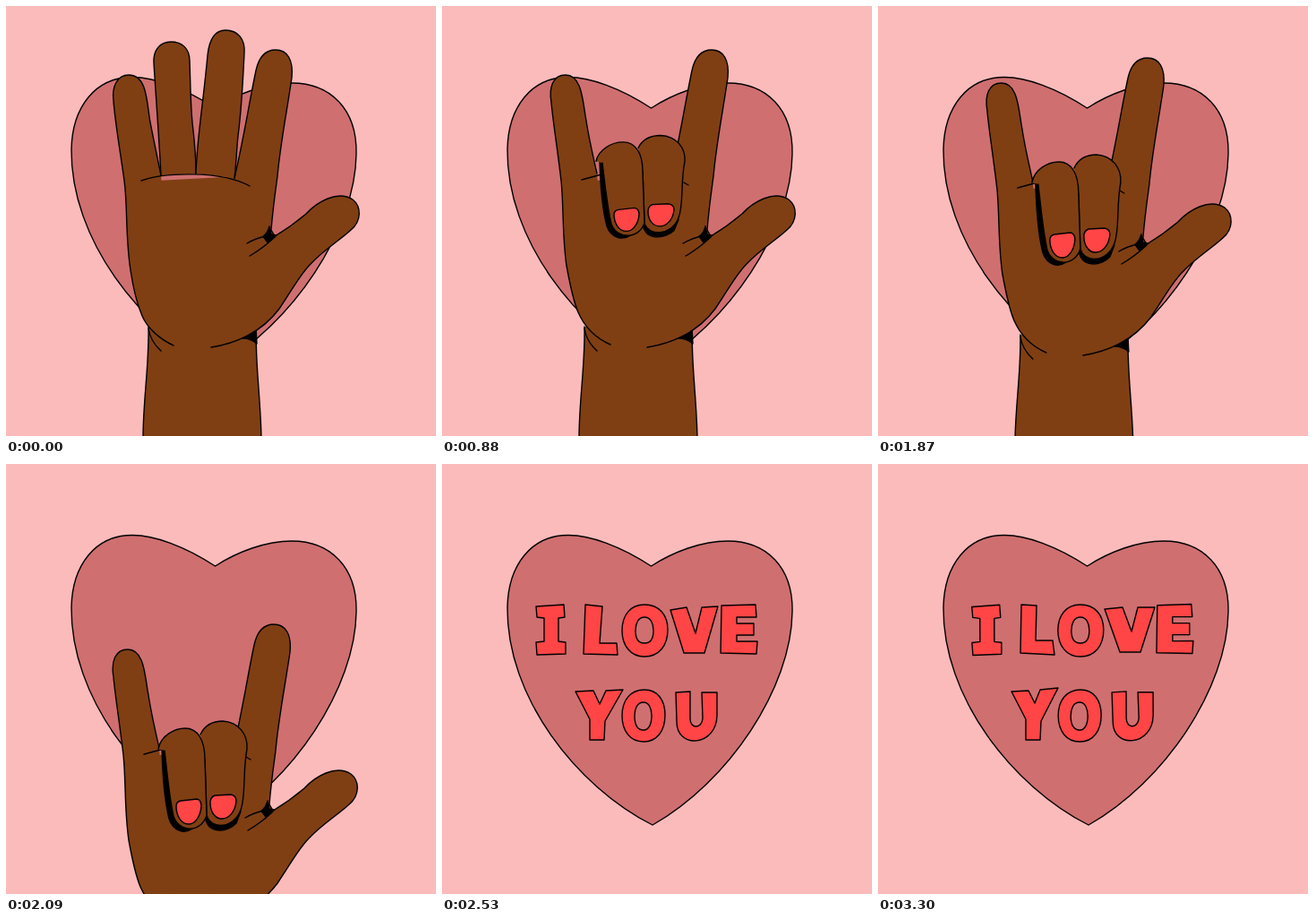
An HTML page that plays this animation: 480 px wide and 480 px high, repeating every 3.41 s.

```html
<!DOCTYPE html>
<html lang="en">
<head>
<meta charset="utf-8">
<title>I love you</title>
<style>
html, body { margin: 0; width: 100%; height: 100%; overflow: hidden; background: #fcbbbb; }
svg { display: block; width: 100%; height: 100%; }
path { stroke: #000; stroke-width: 1.4; stroke-linecap: round; stroke-linejoin: round; }
.heart { fill: #cf6f70; }
.skin { fill: #7f3f13; }
.red { fill: #ff4545; fill-rule: evenodd; }
.line { fill: none; }
.plain { stroke: none; }
</style>
</head>
<body>
<svg viewBox="0 0 480 480">
  <path class="heart" d="M233.5 114C200 92 165 79 140 79.5C100 80 74 112 73 160C72 260 150 360 235 403C320 355 390 250 391 165C392 115 362 86 319 86C290 86 258 98 233.5 114Z"/>

  <g id="words" role="img" aria-label="I love you">
    <g id="steady">
      <path class="red" d="M105 159Q120 158 136 157L137 171 130 172 130 198 138 199 138 212 106 213 105 199 114 198 114 172 106 171Z"/>
      <path class="red" d="M226 157C243 157 252 169 252 185C252 203 242 215 226 215C210 215 201 202 201 186C201 169 210 157 226 157ZM226 171C219 171 216 178 216 186C216 194 219 200 226 200C233 200 236 194 236 186C236 178 233 171 226 171Z"/>
      <path class="red" d="M312 158L350 157 351 171 329 171 329 178 348 178 348 191 329 191 329 198 352 198 351 212 311 211Z"/>
      <path class="red" d="M226 252C241 252 249 264 249 280C249 298 240 310 225 310C210 310 201 298 201 281C201 264 210 252 226 252ZM225 266C218 266 215 273 215 281C215 290 218 297 225 297C231 297 234 290 234 281C234 273 231 266 225 266Z"/>
      <path class="red" d="M261 255L277 254 277 284C277 296 290 296 291 284L290 255 307 255 307 281C306 316 262 318 262 288Z"/>
    </g>
    <path id="loose" class="red"/>
  </g>

  <g id="hand">
    <path class="skin" d="M159 358C160 400 153 440 153 482V700H285V482C284 435 279 410 279 361"/>
    <path d="M260 371Q271 367 279 359L280 377Q272 370 260 371Z"/>
    <path class="skin plain" d="M168 195L262 190 250 378H170L150 330Z"/>
    <path id="pinky" class="skin"/>
    <path class="skin" d="M229 381C255 377 285 365 305 338C320 316 328 300 340 288C355 272 372 262 385 250C397 240 397 224 387 216C370 205 347 219 335 232C322 243 310 251 300 257L296 250C298 225 301 205 303 190C306 155 314 115 319 80C321 60 314 49 301 49C289 49 282 58 279 72C272 105 265 150 255 192"/>
    <path d="M294 246Q292 254 287 257L292 264 302 256 296 255Z"/>
    <path class="line" d="M269 265Q279 259 290 257M272 279Q286 271 300 258M159 360Q161 374 173 385"/>

    <g id="open">
      <path class="skin" d="M173 189C171 150 168 110 165 64C164 49 172 40 184 40C197 40 205 48 205 61C206 90 206 110 208 130C211 155 212 170 212 187"/>
      <path class="skin" d="M212 187C213 150 220 110 225 55C227 36 234 27 245 27C259 27 267 37 266 52C264 95 263 115 259 145C257 165 257 178 255 192"/>
    </g>

    <g id="half">
      <path class="skin" d="M173 189C171 155 167 125 166 95C166 83 177 79 187 79C201 80 214 89 214 101C214 110 211 114 206 118C209 140 214 160 212 187"/>
      <path class="skin" d="M212 187C213 155 217 125 218 104C219 85 231 76 243 77C257 79 267 91 267 103C267 111 263 115 259 115C260 140 258 165 255 192"/>
      <path d="M177 107Q193 117 208 111L206 120C194 124 181 121 177 107ZM229 104Q244 114 259 114L259 123C246 125 234 117 229 104ZM187 94L209 90 209 92Z"/>
      <path class="red" d="M187 94C188 86 197 81 203 83Q208 86 208 90QZ M239 91C241 83 251 80 257 84Q262 88 264 96C254 98 239 98 239 91Z"/>
    </g>

    <path id="palmLine" class="line"/>

    <g id="folded">
      <path d="M176 188C177 225 180 250 184 266C189 281 202 283 210 277L179 188ZM224 262C226 285 250 281 259 271L264 258Z"/>
      <path class="skin" d="M219 172C224 161 234 157 244 157C262 158 272 172 271 188C266 215 270 240 264 256C256 278 230 278 226 262L224 200"/>
      <path class="skin" d="M172 188C175 173 190 165 202 165C216 165 224 178 224 200L226 262C220 282 195 282 189 263C184 240 182 215 179 190"/>
      <path class="red" d="M192 252Q192 247 197 246L215 244Q220 245 220 252C219 265 212 272 206 272C197 272 192 262 192 252ZM230 248Q230 242 235 240L253 239Q259 240 259 246C258 259 250 266 243 266C235 266 230 258 230 248Z"/>
    </g>
  </g>
</svg>
<script>
const STEP = 110, LOOP = 3410;
const FOLD = 6, DROP = 17, WORDS = 21, GONE = 22;
const drops = [9, 48, 130, 250, 385];

const pinkyOpen = "M173 189C168 165 165 150 161 130C157 108 158 77 137 77C124 77 118 90 120 106C122 132 128 165 132 195C136 225 133 255 139 295C142 315 146 332 152 346C158 360 172 372 187 379";
const pinkyBent = "M173 187C168 165 164 148 161 128C157 108 157 77 138 77C124 77 119 90 122 108C124 130 129 160 133 195C136 225 134 255 139 290C143 312 147 330 152 342C160 360 172 371 188 378";
const palmOpen = "M151 195C175 186 240 183 272 201";
const palmBent = "M156 194L178 188M270 197L275 200";

// L, V and Y in two alternating drawings
const looseLetters = [
  "M160 157L177 158 176 197 195 197 197 213 159 211ZM253 162L273 160 283 187 290 160 309 160 293 210 270 210ZM149 254L168 253 175 267 181 252 201 250 182 287 181 308 165 308 165 285Z",
  "M160 157L179 159 176 200 195 200 196 213 158 212ZM255 163L273 160 283 189 290 160 308 159 293 211 270 211ZM149 254L169 253 176 268 183 253 202 252 182 287 181 308 165 308 165 285Z"
];

const el = id => document.getElementById(id);
const set = (id, name, value) => el(id).setAttribute(name, value);
const show = (id, on) => { el(id).style.display = on ? "" : "none"; };

// Squash the folded fingers while they travel down
const foldScale = n => n === FOLD + 1 ? [0.76, -7.4] : n === FOLD + 2 ? [0.93, -1.5] : [1, 0];

function draw(n) {
  const bent = n >= FOLD;
  show("open", !bent);
  show("half", n === FOLD);
  show("folded", n > FOLD);
  set("pinky", "d", bent ? pinkyBent : pinkyOpen);
  set("palmLine", "d", n > FOLD ? palmBent : palmOpen);

  const [scale, shift] = foldScale(n);
  set("folded", "transform", `matrix(1 0 0 ${scale} 0 ${shift})`);

  const drop = drops[n - DROP] || 0;
  set("hand", "transform", `translate(${-drop / 65} ${drop})`);
  show("hand", n < GONE);

  show("words", n >= WORDS);
  set("loose", "d", looseLetters[n % 2]);
  set("steady", "transform", n % 2 ? "" : "rotate(-.2 228 233)");
}

const start = performance.now();
function tick() {
  draw(Math.floor((performance.now() - start) % LOOP / STEP));
  requestAnimationFrame(tick);
}
tick();
</script>
</body>
</html>
```
